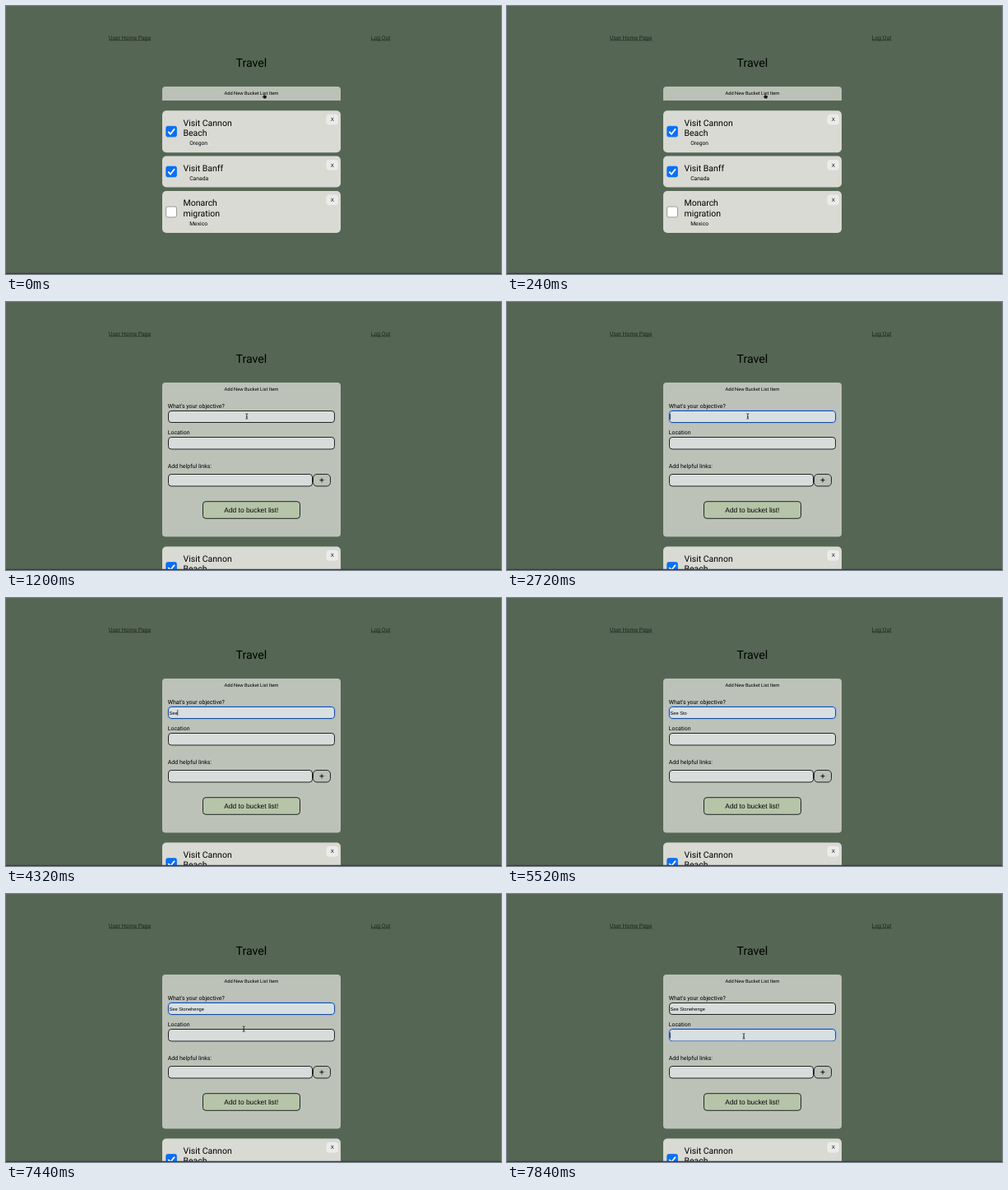
Recreate the animation shown at these times as an HTML page. Size 602 by 326 pixels, loop 8000 ms.

```html
<!DOCTYPE html>
<html lang="en">
<head>
<meta charset="utf-8">
<title>Travel bucket list</title>
<style>
  html, body { margin: 0; width: 100%; height: 100%; overflow: hidden; background: #556754; }
  svg { display: block; width: 100%; height: 100%; }
  text { font-family: Roboto, "Open Sans", sans-serif; font-size: 7px; fill: #000; text-rendering: geometricPrecision; }
  .arial { font-family: "Liberation Sans", Arial, sans-serif; }
  .mid { text-anchor: middle; }
  .link { font-size: 6.87px; fill: #202620; text-decoration: underline; }
  .title { font-size: 10.5px; }
  .place { font-size: 6.75px; }
  .field { fill: #d8dddb; stroke: #222523; }
  .focus { fill: #d8dfe1; stroke: #1d4f9c; }
  .ring { fill: none; stroke: #8fb2e2; }
</style>
</head>
<body>
<svg viewBox="0 0 602 326" preserveAspectRatio="none">
  <rect width="602" height="326" fill="#556754"/>
  <text class="link" x="125" y="40.5">User Home Page</text>
  <text class="link" x="443.7" y="40.5">Log Out</text>
  <text class="mid" x="298.4" y="73.8" style="font-size:14.2px">Travel</text>

  <path id="bar" d="M190 115V102a4 4 0 0 1 4-4H403a4 4 0 0 1 4 4V115Z" fill="#bcc1b7"/>
  <g id="form">
    <rect x="190" y="98" width="217" height="187.5" rx="4" fill="#bdc2b9"/>
    <text x="196.8" y="128.8">What's your objective?</text>
    <rect id="goal" x="197.5" y="132.5" width="202" height="14" rx="3.5"/>
    <text x="196.8" y="160.9" style="font-size:6.9px">Location</text>
    <rect id="spot" x="197.5" y="164.5" width="202" height="14.5" rx="3.5"/>
    <rect id="ring" class="ring" x="196.5" width="204" height="16" rx="4.5"/>
    <text x="196.8" y="201.5">Add helpful links:</text>
    <rect class="field" x="197.5" y="209.5" width="175" height="14.5" rx="3.5"/>
    <rect class="field" x="373.5" y="209.5" width="21" height="14.5" rx="4.5" style="fill:#bcc1b8"/>
    <path d="M381.4 216.7h5.2M384 214.1v5.2" stroke="#000" stroke-width=".9"/>
    <rect class="field" x="239.5" y="242.7" width="118" height="20.6" rx="3.5" style="fill:#b6c4a8"/>
    <text class="arial mid" x="298.4" y="256" style="font-size:8.4px">Add to bucket list!</text>
    <text id="typed" class="arial" x="198.5" y="141.7" style="font-size:5.7px"></text>
    <path id="caret" d="M0 0V7" stroke="#111" stroke-width=".7"/>
  </g>
  <text class="mid" x="298.4" y="108.2" style="font-size:5.77px">Add New Bucket List Item</text>
  <g id="cards"></g>
  <rect y="324.8" width="602" height="1.2" fill="#3a3a3e"/>

  <path id="hand" d="M-.9 -2.6q.8-.9 1.5 0V.1l2 .5q.7.3.5 1.2l-.6 2.4h-3l-2-2.8q0-.9 1.6-.1Z" fill="#111" stroke="#eee" stroke-width=".35"/>
  <path id="arrow" d="M-1.5-3.5v6l1.4-1.2 1 2.2 1-.5-1-2 1.8-.2Z" fill="#111" stroke="#eee" stroke-width=".35"/>
  <path id="beam" d="M-1.4-3.2Q0-3.2 0-2.4Q0-3.2 1.4-3.2M0-2.4V2.4M-1.4 3.2Q0 3.2 0 2.4Q0 3.2 1.4 3.2M-.8 .8H.8" fill="none" stroke="#161616" stroke-width=".8"/>
</svg>
<script>
const $ = id => document.getElementById(id);
const LOOP = 8000, STEP = 80;
const OPEN = 320, FOCUS = 1760, HIDE = 3520, SHOW = 7200, NEXT = 7760;
const PHRASE = "See Stonehenge";
const KEYS = [3440, 4080, 4320, 4800, 5200, 5440, 5520, 5680, 6000, 6240, 6400, 6560, 6800, 7120];
const POINTS = { bar: [314, 108.5], goal: [292.8, 139], spot: [288, 173] };

function card(y, h, lines, place, done) {
  const box = y + h / 2 - 6.4;
  const titles = lines.map((s, i) =>
    `<text class="title" x="215.5" y="${y + 18.3 + i * 12.6}">${s}</text>`).join("");
  const tick = done
    ? `<path d="M197.3 ${box + 6.6}l2.7 2.9 5-6.4" fill="none" stroke="#fff" stroke-width="1.8"/>` : "";
  return `<rect x="190" y="${y}" width="217" height="${h}" rx="5" fill="#d9dad3"/>
    <rect x="194.7" y="${box}" width="12.8" height="12.8" rx="2" fill="${done ? "#0b6ff5" : "#fff"}"
      stroke="${done ? "#0b6ff5" : "#767676"}" stroke-width=".7"/>${tick}${titles}
    <text class="place" x="223.2" y="${y + 29.4 + (lines.length - 1) * 12.6}">${place}</text>
    <rect x="389.4" y="${y + 4.5}" width="14.6" height="12.8" rx="4" fill="#ebebea"/>
    <text class="arial mid" x="396.7" y="${y + 13}" style="font-size:6.2px">X</text>`;
}

$("cards").innerHTML =
  card(127.2, 51, ["Visit Cannon", "Beach"], "Oregon", true) +
  card(182.5, 38, ["Visit Banff"], "Canada", true) +
  card(225, 51, ["Monarch", "migration"], "Mexico", false);

const show = (id, on) => $(id).setAttribute("visibility", on ? "inherit" : "hidden");
const move = (id, x, y) => $(id).setAttribute("transform", `translate(${x} ${y})`);
const ease = p => p * p * (3 - 2 * p);

// Stepped travel between two points; reaches b at the end time.
function glide(t, start, end, a, b) {
  const q = Math.floor(t / STEP) * STEP;
  const p = ease(Math.min(1, Math.max(0, (q - start) / (end - start))));
  return a.map((v, i) => v + (b[i] - v) * p);
}

function drawPointer(t) {
  const [x, y] = t < HIDE
    ? glide(t, 880, 1200, POINTS.bar, POINTS.goal)
    : glide(t, 7120, 7600, POINTS.goal, POINTS.spot);
  const over = y < 115 ? "hand"
    : (y > 132 && y < 147.5) || y > 164 ? "beam" : "arrow";
  const visible = t < HIDE || t >= SHOW;
  for (const id of ["hand", "arrow", "beam"]) {
    show(id, visible && id === over);
    move(id, x, y);
  }
}

function drawForm(t) {
  const next = t >= NEXT;
  $("goal").setAttribute("class", t >= FOCUS && !next ? "focus" : "field");
  $("spot").setAttribute("class", next ? "focus" : "field");
  show("ring", t >= FOCUS);
  $("ring").setAttribute("y", next ? 163.5 : 131.5);

  const count = KEYS.filter(k => t >= k).length;
  const typed = $("typed");
  typed.textContent = PHRASE.slice(0, count).replace(/ /g, "\u00a0");
  const end = 198.6 + (count && !next ? typed.getComputedTextLength() : 0);

  // The caret blinks while idle, stays on for the first word, and is lost in fast typing.
  const lit = count === 0
    ? Math.floor((t - FOCUS) / 480) % 2 === 0
    : next || count <= PHRASE.indexOf(" ") + 1;
  show("caret", t >= FOCUS && lit);
  move("caret", end, next ? 168.5 : 136);
}

function draw(t) {
  const open = t >= OPEN;
  show("bar", !open);
  show("form", open);
  move("cards", 0, open ? 170.3 : 0);
  if (open) drawForm(t);
  drawPointer(t);
}

const begin = performance.now();
function tick() {
  draw((performance.now() - begin) % LOOP);
  requestAnimationFrame(tick);
}
tick();
</script>
</body>
</html>
```
